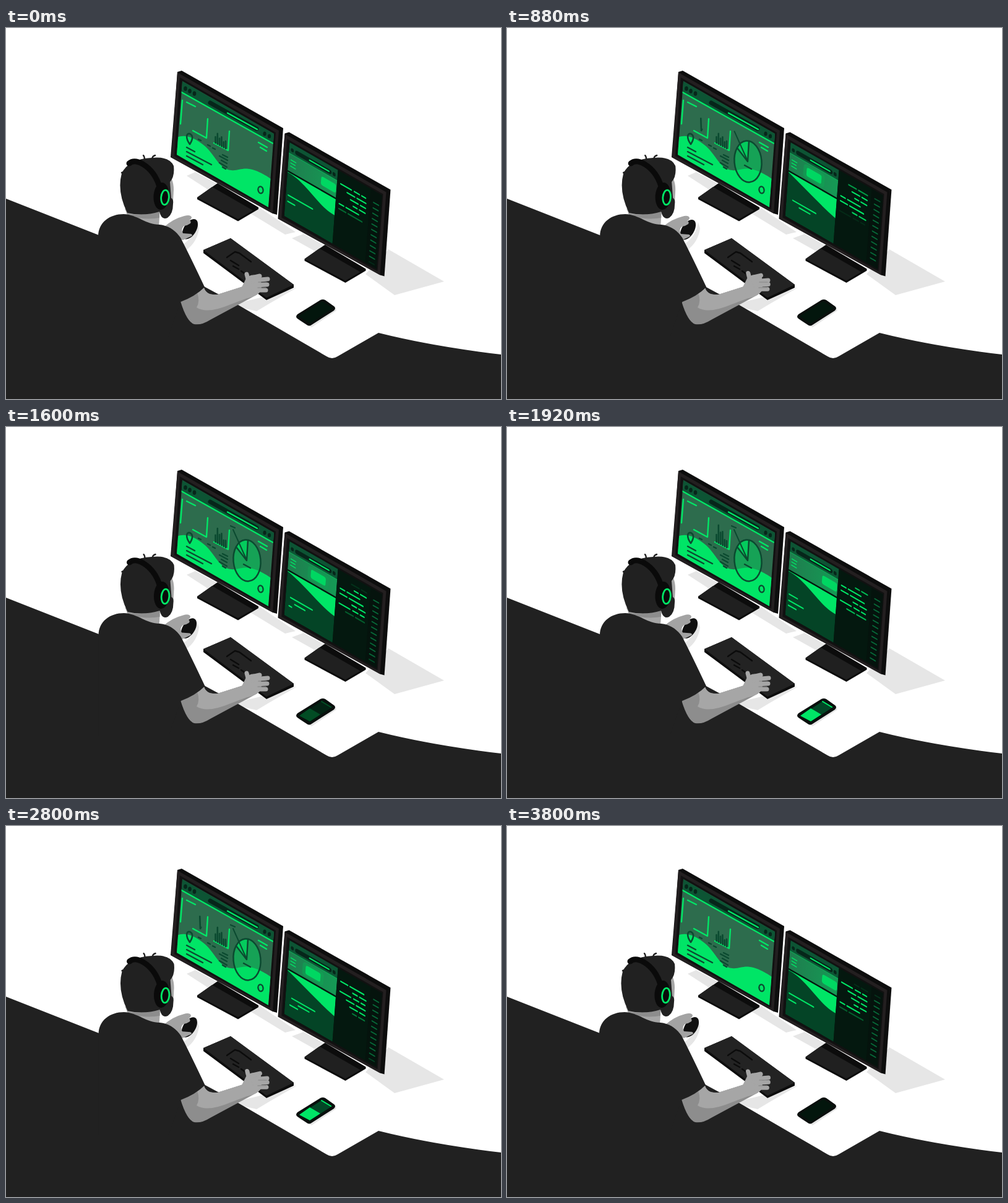
Write an HTML page that moves like this. It is 800 by 600 pixels and loops after 3.84 s.

```html
<!DOCTYPE html>
<html lang="en">
<head>
<meta charset="utf-8">
<title>Desk</title>
<style>
html, body { margin: 0; width: 100%; height: 100%; overflow: hidden; background: #fff; }
svg { display: block; width: 800px; height: 600px; }
.ln { fill: none; stroke-linecap: round; stroke-linejoin: round; }
.ink { stroke: #0b4a30; }
.lime { stroke: #00e766; }
</style>
</head>
<body>
<svg viewBox="0 0 800 600">
  <defs>
    <clipPath id="screen"><path d="M285 86L433 171L424 290L276 205Z"/></clipPath>
    <clipPath id="site"><path d="M0 0H78V119H0Z"/></clipPath>
    <clipPath id="plot"><path d="M300 136H326V178H300Z"/></clipPath>
    <linearGradient id="hero"><stop stop-color="#1f7d4e"/><stop offset="1" stop-color="#159a55"/></linearGradient>
    <g id="monitor">
      <path d="M309 274L342 251L408 290V293L375 312.500L309 277Z" fill="#0c0c0c"/>
      <path d="M309 274L333 257L399 295L375 309Z" fill="#202020"/>
      <path d="M277 71L284 69L448 162L438 302L431 300L266 209Z" fill="#0d0d0d"/>
      <path d="M277 72L441 166L431 300L267 209Z" fill="#231f20"/>
      <path d="M281 80L436 169L427 294L272 207Z" fill="#111"/>
    </g>
  </defs>

  <!-- shadows on the desk -->
  <g fill="#e6e6e6">
    <path d="M292 239L306 233L345 254L329 263Z"/>
    <path d="M392 298L409 290L468 330L451 334Z"/>
    <path d="M462 340L481 333L520 355L505 364Z"/>
    <path d="M581 398L618 358L708 410L628 432Z"/>
    <path d="M362 448L448 427L470 420L425 446L405 458Z"/>
    <path d="M283 352Q306 338 309 314L312 324Q309 347 290 360Z"/>
    <path d="M473 473L530 449L534 457L494 484Z"/>
  </g>

  <path d="M0 276L150 335L320 418L372 446L518 531Q527 537 536 531L602 493Q690 515 800 528V600H0Z" fill="#212121"/>

  <!-- left display -->
  <use href="#monitor"/>
  <g clip-path="url(#screen)">
    <path d="M270 80H440V300H270Z" fill="#2d6c4d"/>
    <path d="M285 86L433 171V188L284 104Z" fill="#0d5434"/>
    <path d="M276 177C290 171 305 178 319 189C339 205 343 228 364 230C381 232 388 217 428 244L424 290L276 205Z" fill="#00e566"/>
    <path class="ln lime" stroke-width="2.200" d="M283 103.500L431 186.500"/>
    <g fill="#06261a">
      <ellipse cx="290" cy="98" rx="2.800" ry="3.800"/><ellipse cx="297" cy="102" rx="2.800" ry="3.800"/><ellipse cx="304.500" cy="106" rx="2.800" ry="3.800"/>
      <ellipse cx="418" cy="171" rx="2.600" ry="3.600"/><ellipse cx="425.500" cy="175" rx="2.600" ry="3.600"/>
    </g>
    <path class="ln" stroke="#06261a" stroke-width="7" d="M330 121L405 163"/>
    <path class="ln lime" stroke-width="2.400" d="M358 137.500L406 164"/>
    <path class="ln lime" stroke-width="2.400" d="M285 117L282 155M292 120L306 127M326 147L324 178L302 166M361 167L359 198L336 186M408 185L422 193M411 193L421 199"/>
    <path class="ln ink" stroke-width="2.400" d="M292 193L305 200M292 200L332 221M292 207L318 221M311 180L315 182M326 189L330 191M334 194L338 196M350 205L358 209M345 207L358 214M348 214L357 219M345 218L357 225M350 225L355 228"/>
    <path class="ln ink" stroke-width="2.600" d="M297 188C290 178 291 170 297 171C303 174 302 180 297 188Z"/>
    <ellipse class="ln ink" stroke-width="2.400" cx="411.500" cy="262" rx="4" ry="5.500" transform="rotate(-12 411 262)"/>
    <path id="bars" class="ln ink" stroke-width="2.600"/>
    <path id="trend" class="ln ink" clip-path="url(#plot)" stroke-width="2.600" pathLength="100" d="M303 139L306 147L309 142L311 146L313 140L314 166L317 161L319 163L323 174"/>
    <g id="pie">
      <ellipse cx="389.500" cy="216" rx="22" ry="33.500" transform="rotate(-5 389 216)" fill="#00d860" opacity=".5"/>
      <path d="M389 216L372 194Q380 182 391 183Z" fill="#00d760" opacity=".8"/>
      <path class="ln ink" stroke-width="2.400" d="M391 183L389 216L372 194M384 222L395 228"/>
      <ellipse class="ln ink" stroke-width="2.500" cx="389.500" cy="216" rx="22" ry="33.500" transform="rotate(-5 389 216)"/>
    </g>
    <path id="callout" class="ln ink" stroke-width="2" pathLength="100" d="M388 213L367 166"/>
    <path id="label" class="ln ink" stroke-width="2.200" d="M363 160L370 163"/>
  </g>

  <!-- right display -->
  <use href="#monitor" x="173.500" y="99.500"/>
  <g transform="matrix(1 .573 -.075 1 458.500 185)">
    <path d="M0 0H149V119H0Z" fill="#04180f"/>
    <path d="M131 0H149V119H131Z" fill="#05130d"/>
    <g clip-path="url(#site)">
      <path d="M0 0H78V119H0Z" fill="#044426"/>
      <path d="M0 0H78V17H0Z" fill="#0d5434"/>
      <path d="M0 17H78V45H0Z" fill="url(#hero)"/>
      <path class="ln lime" stroke-width="1" d="M0 17H78" opacity=".6"/>
      <g fill="#06261a"><ellipse cx="5" cy="10" rx="2.500" ry="3"/><ellipse cx="72.500" cy="10" rx="2.500" ry="3"/></g>
      <path class="ln" stroke="#06261a" stroke-width="7" d="M13 10H65"/>
      <path class="ln lime" stroke-width="2.200" d="M33 10H64"/>
      <path class="ln lime" stroke-width="1.500" d="M4 26H12M4 31H11M4 36H12"/>
      <path id="wave" fill="#00e566"/>
      <path stroke="#04180f" stroke-width="2.500" d="M0 46H78"/>
      <rect id="glow" y="20" width="34" height="22" rx="5" fill="#10a354" opacity=".6"/>
      <rect id="button" y="24" width="24" height="14" rx="3" fill="#00d762"/>
      <path id="copy" class="ln lime" stroke-width="2.200"/>
    </g>
    <g id="code" class="ln lime" stroke-width="2.300"></g>
    <g id="side" class="ln" stroke="#076a39" stroke-width="2"></g>
  </g>

  <!-- phone -->
  <path d="M471 463L508 440Q512 438 516 440L530 450Q534 453 530 457L494 480Q490 483 486 480L471 470Q467 467 471 463Z" fill="#0a0f0d"/>
  <path d="M473 466L511 442L528 453L491 478Z" fill="#03160d"/>
  <g id="phone">
    <path d="M474 467L511 443L527 453L491 476Z" fill="#034626"/>
    <path d="M474 467L491 455L508 465L491 476Z" fill="#00e566"/>
    <path class="ln lime" stroke-width="2" d="M510 444L525 453"/>
  </g>

  <!-- keyboard -->
  <path d="M319 359L363 340L465 415V420L421 440L319 364Z" fill="#0d0d0d"/>
  <path d="M319 359L363 340L465 415L421 436Z" fill="#232323"/>
  <path class="ln" stroke="#0b0b0b" stroke-width="2.400" d="M357 371L370 362L377 364L396 378M363 376L376 384M367 385L376 390M380 393L387 398"/>

  <!-- mouse and hand -->
  <g id="mouse">
    <ellipse cx="297.500" cy="325" rx="10" ry="18" transform="rotate(31 297 325)" fill="#101010"/>
    <path d="M252 325Q268 309 288 304Q298 301 300 306Q300 309 296 311Q300 312 298 316Q294 319 288 320Q282 325 286 332L299 333Q303 335 299 337L286 343Q278 342 266 330Z" fill="#a3a3a3"/>
  </g>

  <!-- forearm and typing hand -->
  <g id="arm">
    <path d="M282 442L320 420Q324 433 342 431L383 418L406 431L395 437L330 472Q316 481 304 479Q292 475 282 442Z" fill="#8d8d8d"/>
    <path d="M309 428L320 420Q324 433 342 431L383 418L407 430Q385 439 363 447Q325 463 308 452Q314 442 309 428Z" fill="#a6a6a6"/>
    <path d="M380 421L388 405Q397 395 412 403L413 424Q406 434 390 437Z" fill="#a6a6a6"/>
    <g id="fingers" class="ln" stroke="#a6a6a6" stroke-width="7">
      <path d="M393 413L389 398"/><path d="M397 404L410 401"/><path d="M400 408L423 406"/><path d="M402 416L422 415"/><path d="M400 424L420 424"/>
    </g>
    <path class="ln" stroke="#858585" stroke-width="1.200" d="M408 411L421 411M407 420L420 420"/>
  </g>

  <!-- seated figure -->
  <g id="body">
    <path d="M192 292L249 290L247 322L225 318L196 302Z" fill="#a6a6a6"/>
    <path d="M194 300Q222 306 248 296V307Q225 311 200 304Z" fill="#8d8d8d"/>
    <path d="M149 337C149 314 168 301 190 301C213 302 226 318 248 318C262 319 274 327 282 339Q298 370 321 419Q306 434 282 443L262 500H149Z" fill="#212121"/>
    <path d="M258 235Q271 240 271 262L270 280L256 290Z" fill="#a6a6a6"/>
    <path d="M187 235Q198 212 235 210Q264 207 271 223Q273 240 265 249L267 275Q271 277 270 284Q270 301 261 307Q251 311 248 297Q222 305 196 299Q179 265 187 235Z" fill="#212121"/>
    <path class="ln" stroke="#212121" stroke-width="2.400" d="M187 234Q190 232 194 234M222 206Q224 208 224 213M241 206Q236 207 236 213"/>
    <path class="ln" stroke="#0a0a0a" stroke-width="9" d="M199 219Q207 212 221 220Q244 234 250 265"/>
    <ellipse cx="251" cy="272" rx="12.500" ry="22" transform="rotate(4 251 272)" fill="#0a0a0a"/>
    <ellipse class="ln lime" stroke-width="2.800" cx="257" cy="274" rx="6.300" ry="12" transform="rotate(5 257 274)"/>
  </g>
</svg>
<script>
const LOOP = 3840, HALF = LOOP / 2;
const $ = id => document.getElementById(id);
const ease = x => x * x * (3 - 2 * x);
const mix = (a, b, k) => a + (b - a) * k;
const unit = x => Math.max(0, Math.min(1, x));
const set = (id, attrs) => { for (const k in attrs) $(id).setAttribute(k, attrs[k]); };

// Eased value at time t from [time, value] steps.
function at(t, steps) {
  let [t0, v0] = steps[0];
  for (const [t1, v1] of steps) {
    if (t <= t1) return t1 === t0 ? v1 : mix(v0, v1, ease(unit((t - t0) / (t1 - t0))));
    [t0, v0] = [t1, v1];
  }
  return v0;
}

function addPaths(id, list) {
  return list.map(d => {
    const p = document.createElementNS("http://www.w3.org/2000/svg", "path");
    p.setAttribute("d", d);
    $(id).append(p);
    return p;
  });
}

const PITCH = 8;
const rows = addPaths("code", [
  "M84 0h17M106 0h8M118 0h6", "M95 0h12M111 0h14", "M101 0h12M117 0h8",
  "M106 0h6M116 0h9", "M84 0h7M95 0h20", "M84 0h11M99 0h22", "M104 0h7M115 0h10"
]);
const marks = addPaths("side", Array.from({ length: 12 }, () => "M137 0h8"));

const low = [10, 17, 11, 15, 9, 12], high = [12, 29, 19, 22, 11, 11];
const fingers = [...$("fingers").children];

function draw(t) {
  const h = t % HALF;

  // charts
  const rise = at(t, [[1300, 0], [1850, 1], [2500, 1], [3150, 0]]);
  set("bars", { d: low.map((v, i) => `M${338.5 + i * 3.3} ${186 + i * 1.8}v${-mix(v, high[i], rise)}`).join("") });
  const head = at(h, [[380, 104], [520, 78], [880, 44], [1280, 0], [1560, -34]]);
  set("trend", { "stroke-dasharray": "31 300", "stroke-dashoffset": -head,
    visibility: h > 390 && h < 1550 ? "visible" : "hidden" });

  const pie = at(t, [[380, 0], [760, 1], [3280, 1], [3700, 0]]);
  set("pie", { transform: `translate(389 216) scale(${pie}) translate(-389 -216)` });
  const call = at(t, [[700, 0], [900, 1], [2880, 1], [3120, 0]]);
  set("callout", { "stroke-dasharray": `${call * 100} 200`, visibility: call > .01 ? "visible" : "hidden" });
  set("label", { opacity: at(t, [[880, 0], [1060, 1], [2800, 1], [2980, 0]]) });

  // web page
  const slide = at(h, [[140, 0], [650, 1], [1460, 1], [1820, 0]]);
  const x = mix(53, 28, slide);
  set("button", { x });
  set("glow", { x: x - 5, opacity: .6 * slide });
  set("wave", { d: `M0 47H78V${mix(73, 78, slide)}C${mix(52, 51, slide)} ${mix(75, 70, slide)} ${mix(32, 27, slide)} ${mix(47, 58, slide)} 0 48Z` });
  const extra = at(t, [[1450, 0], [1850, 1], [3300, 1], [3700, 0]]);
  set("copy", { d: `M${mix(4, 10, slide)} ${mix(83, 88, slide)}h${mix(39, 37, slide) - 26 * extra * (1 - slide)}`
    + `M${mix(4, 21, slide)} ${mix(93, 94, slide)}h${mix(11, 17, slide) + 12 * extra * (1 - slide)}`
    + (extra > .02 ? `M${mix(4, 8, slide)} ${mix(101, 100, slide)}h${12 * extra}` : "") });

  // scrolling lists
  const span = rows.length * PITCH, run = t / LOOP * span;
  rows.forEach((p, i) => {
    const y = ((i * PITCH + 8 - run) % span + span) % span;
    p.setAttribute("transform", `translate(0 ${11 + y})`);
    p.setAttribute("opacity", unit(Math.min(y / 5, (span - 4 - y) / 10)));
  });
  const shift = t / LOOP * 26.1 % 8.7;
  marks.forEach((p, i) => {
    const y = 10 + i * 8.7 + 8.7 - shift;
    p.setAttribute("transform", `translate(0 ${y})`);
    p.setAttribute("opacity", unit(Math.min((y - 8) / 6, (116 - y) / 6)));
  });

  set("phone", { opacity: at(t, [[1500, 0], [1800, 1], [3300, 1], [3780, 0]]) });

  // figure
  const sway = at(t, [[0, 0], [880, 1.2], [1280, 0], [1920, 1], [2440, 1], [3200, 0]]);
  set("body", { transform: `translate(${sway} 0)` });
  const mx = at(t, [[0, 0], [880, -5], [1280, -2], [2440, -2], [3200, 0]]);
  set("mouse", { transform: `translate(${mx} ${-mx * .2})` });
  fingers.forEach((p, i) => {
    const dy = 1.5 * Math.sin(t / LOOP * Math.PI * 24 + i * 1.9) - 1.5 * Math.sin(i * 1.9);
    p.setAttribute("transform", `translate(${-dy * .5} ${dy})`);
  });
}

function tick() {
  draw(performance.now() % LOOP);
  requestAnimationFrame(tick);
}
tick();
</script>
</body>
</html>
```
